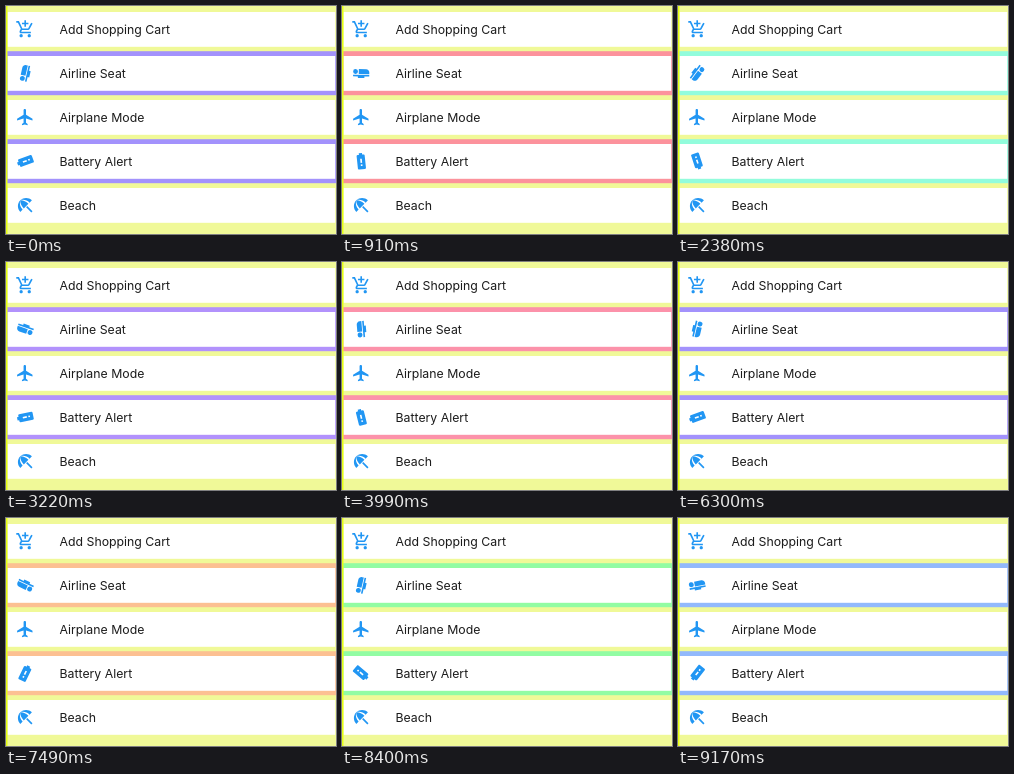
These frames come from a looping animation (330x228 px, 9240 ms). An HTML page:

```html
<!DOCTYPE html>
<html lang="en">
<head>
<meta charset="utf-8">
<style>
  html, body { margin: 0; width: 100%; height: 100%; overflow: hidden; }
  svg { display: block; width: 330px; height: 228px; background: #f0f998; }
  text { font: 400 12.3px Inter, Roboto, sans-serif; fill: #1c1c1c; }
  .icon { fill: #2196f3; fill-rule: evenodd; }
</style>
</head>
<body>
<svg id="stage" viewBox="0 0 330 228"></svg>
<script>
const FRAME = 70, LOOP = 9240, PITCH = 44;

const items = [
  { label: "Add Shopping Cart",
    icon: "M11 9h2V6h3V4h-3V1h-2v3H8v2h3v3zm-4 9c-1.1 0-1.99.9-1.99 2S5.9 22 7 22s2-.9 2-2-.9-2-2-2zm10 0c-1.1 0-1.99.9-1.99 2s.89 2 1.99 2 2-.9 2-2-.9-2-2-2zm-9.83-3.25l.03-.12.9-1.63h7.45c.75 0 1.41-.41 1.75-1.03l3.86-7.01L19.42 4h-.01l-1.1 2-2.76 5H8.53L6.16 6l-1.89-4H1v2h2l3.6 7.59-1.35 2.45c-.16.28-.25.61-.25.96 0 1.1.9 2 2 2h12v-2H7.42c-.13 0-.25-.11-.25-.25z" },
  { label: "Airline Seat", start: 283, step: 6,
    icon: "M22 11v2H9V7h9c2.21 0 4 1.79 4 4zM2 14v2h6v2h8v-2h6v-2H2zM2 10a3 3 0 1 0 6 0a3 3 0 1 0-6 0z" },
  { label: "Airplane Mode",
    icon: "M21 16v-2l-8-5V3.5c0-.83-.67-1.5-1.5-1.5S10 2.67 10 3.5V9l-8 5v2l8-2.5V19l-2 1.5V22l3.5-1 3.5 1v-1.5L13 19v-5.5l8 2.5z" },
  { label: "Battery Alert", start: 250, step: 8,
    icon: "M15.67 4H14V2h-4v2H8.33C7.6 4 7 4.6 7 5.33v15.33C7 21.4 7.6 22 8.33 22h7.33c.74 0 1.34-.6 1.34-1.33V5.33C17 4.6 16.4 4 15.67 4zM13 18h-2v-2h2v2zm0-4h-2V9h2v5z" },
  { label: "Beach",
    icon: "M13.13 14.56l1.43-1.43 6.44 6.44L19.57 21zm4.29-5.73l2.86-2.86c-3.95-3.95-10.35-3.96-14.3-.02 3.93-1.3 8.31-.25 11.44 2.88zM5.95 5.98c-3.94 3.95-3.93 10.35.02 14.3l2.86-2.86C5.7 14.29 4.65 9.91 5.95 5.98zm.02-.02l-.01.01c-.38 3.01 1.17 6.88 4.3 10.02l5.73-5.73c-3.13-3.13-7.01-4.68-10.02-4.3z" }
];

const stage = document.getElementById("stage");

function add(tag, attributes, parent = stage) {
  const node = document.createElementNS("http://www.w3.org/2000/svg", tag);
  for (const name in attributes) node.setAttribute(name, attributes[name]);
  return parent.appendChild(node);
}

const spinners = [];
items.forEach(({ label, icon, start, step }, i) => {
  const row = add("g", { transform: `translate(0 ${i * PITCH})` });
  const border = step && add("rect", { x: 1, y: 1.2, width: 329, height: 44 }, row);
  add("rect", { x: 1.5, y: 6, width: 327.7, height: 34.8, fill: "#fff" }, row);
  const place = add("g", { transform: "translate(19.2 23.2) scale(.81)" }, row);
  const glyph = add("path", { d: icon, class: "icon", transform: "translate(-12 -12)" }, place);
  add("text", { x: 53.5, y: 27.7 }, row).textContent = label;
  if (step) spinners.push({ border, glyph, start, step });
});
add("rect", { width: 1.5, height: 228, fill: "#e6ff14" });

function draw(now) {
  const tick = Math.floor(now % LOOP / FRAME);
  for (const { border, glyph, start, step } of spinners) {
    border.setAttribute("fill", `hsl(${250 + 8 * tick}, 95%, 78%)`);
    glyph.setAttribute("transform", `rotate(${start + step * tick}) translate(-12 -12)`);
  }
}

let origin;
function loop(now) {
  origin ??= now;
  draw(now - origin);
  requestAnimationFrame(loop);
}
draw(0);
requestAnimationFrame(loop);
</script>
</body>
</html>
```
